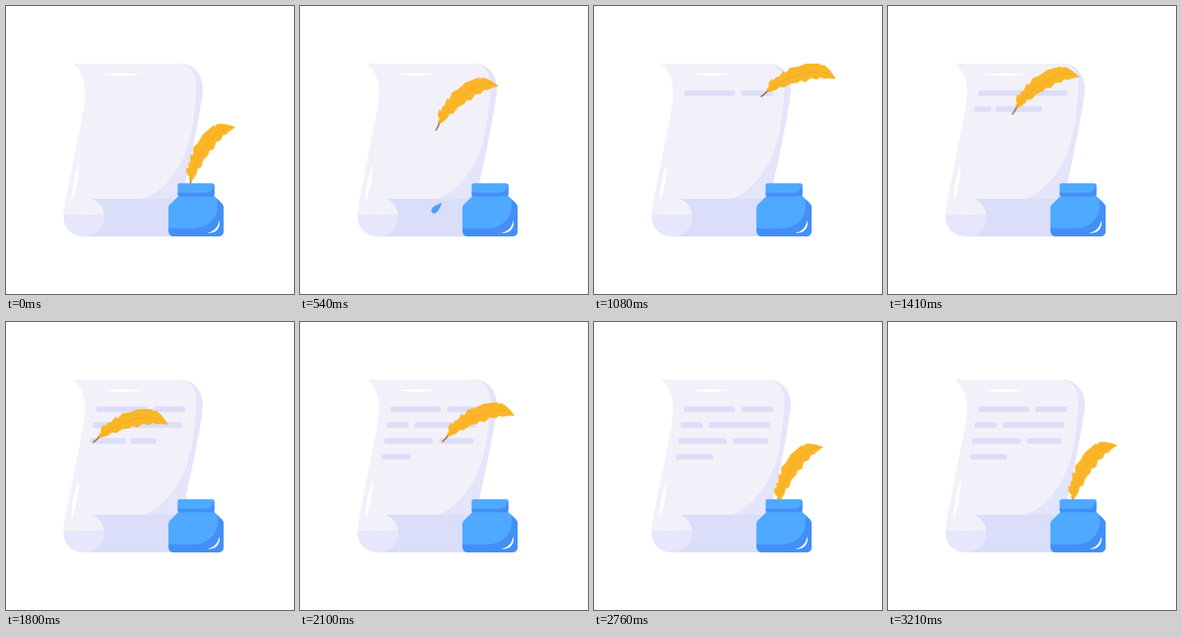
An HTML page without scripts for the animation above (3270 ms loop, 360x360 px).

```html
<!DOCTYPE html>
<html lang="en">
<head>
<meta charset="utf-8">
<title>Quill and paper</title>
<style>
html, body { margin: 0; width: 100%; height: 100%; overflow: hidden; background: #fff; }
svg { display: block; width: 100vw; height: 100vh; }

.quill, .drop, .line { animation: 3270ms linear infinite both; }
.quill { animation-name: write; }
.drop { animation-name: drip; }
.line { fill: none; stroke: #dcdef8; stroke-width: 7; stroke-linecap: round; }
.l1 { transform-origin: 113px 0; animation-name: l1; }
.l2 { transform-origin: 108px 0; animation-name: l2; }
.l3 { transform-origin: 105px 0; animation-name: l3; }
.l4 { transform-origin: 102px 0; animation-name: l4; }

/* position of the nib, then tilt of the feather */
@keyframes write {
  0% { transform: translate(229.5px, 228px) rotate(-40deg); }
  4.6% { transform: translate(228px, 196px) rotate(-34deg); }
  8.3% { transform: translate(206px, 165px) rotate(-27deg); }
  11.9% { transform: translate(172px, 153px) rotate(-22deg); }
  16.5% { transform: translate(170px, 155px) rotate(-22deg); animation-timing-function: ease-in-out; }
  23.9% { transform: translate(95px, 112px) rotate(-22deg); }
  33% { transform: translate(209px, 113px) rotate(0deg); }
  34.3% { transform: translate(214px, 114px) rotate(0deg); }
  38.2% { transform: translate(118px, 132px) rotate(-2deg); }
  39.5% { transform: translate(107px, 134px) rotate(-22deg); }
  43.1% { transform: translate(155px, 135px) rotate(-16deg); }
  47.7% { transform: translate(214px, 133px) rotate(0deg); }
  55.1% { transform: translate(109px, 150px) rotate(0deg); }
  57.2% { transform: translate(96px, 148px) rotate(-22deg); }
  67.3% { transform: translate(214px, 150px) rotate(0deg); }
  68.3% { transform: translate(214px, 151px) rotate(0deg); }
  73.4% { transform: translate(226px, 197px) rotate(-25.5deg); }
  77% { transform: translate(229px, 220px) rotate(-36deg); }
  82.6% { transform: translate(229.5px, 233px) rotate(-40deg); }
  98.2% { transform: translate(229.5px, 230.5px) rotate(-40deg); }
  100% { transform: translate(229.5px, 228px) rotate(-40deg); }
}
@keyframes drip {
  0%, 10.9% { transform: translate(171px, 158px) scale(0); }
  11% { transform: translate(171px, 158px) scale(.4); animation-timing-function: ease-in; }
  16.5% { transform: translate(170px, 252px) scale(1); opacity: 1; }
  18.3%, 100% { transform: translate(168px, 282px) scale(1); opacity: 0; }
}
@keyframes l1 { 0%, 23.9% { transform: scaleX(0); } 32.8%, 100% { transform: none; } }
@keyframes l2 { 0%, 36.3% { transform: scaleX(0); } 43.1% { transform: scaleX(.75); } 46%, 100% { transform: none; } }
@keyframes l3 { 0%, 48.3% { transform: scaleX(0); } 55.1% { transform: scaleX(.74); } 58%, 100% { transform: none; } }
@keyframes l4 { 0%, 59.5% { transform: scaleX(0); } 65.6%, 100% { transform: none; } }
</style>
</head>
<body>
<svg viewBox="0 0 360 360">
  <!-- paper -->
  <path fill="#e4e4fb" d="M170 72H219C238 73 247 90 246 107C241 145 230 195 224 222L215 250H150Z"/>
  <path fill="#f2f1fa" d="M84 72H219C231 74 238 84 238 100C237 130 232 165 224 184C212 213 192 235 169 242L123 262L72 263C72 250 76 235 78 224L97 128C101 104 99 85 84 72Z"/>
  <path fill="#dadef9" d="M107 241H216L206 288H98L123 262C122 252 116 244 107 241Z"/>
  <path fill="#e6e6fc" d="M72 261Q98 262 123 260C124 277 113 288 98 288C82 288 71 277 72 261Z"/>
  <path fill="#fff" d="M121 85.5Q146 82 171 85.5Q146 89 121 85.5Z"/>
  <path fill="#fff" d="M91 197Q91 222 82 246Q82 220 91 197Z"/>

  <!-- writing -->
  <path class="line l1" d="M116 109H173M187.500 109H220.500"/>
  <path class="line l2" d="M111.500 128.700H132.500M146.500 128.700H217"/>
  <path class="line l3" d="M108.500 148.700H162.500M177 148.700H214"/>
  <path class="line l4" d="M105.500 168.500H145.500"/>

  <g class="drop">
    <path fill="#479ff6" d="M7 -7C6 -2 3 5 -2 6.500C-6 7 -7 2 -4 -1C-1 -4 4 -5 7 -7Z"/>
  </g>

  <!-- feather -->
  <g class="quill">
    <path fill="none" stroke="#a8642c" stroke-width="1.800" stroke-linecap="round" d="M0 0Q5 -3 9 -9"/>
    <path fill="#fab627" d="M8 -5L6.500 -10L9 -11L9 -17L13 -22L15 -20L19 -25L21 -24L28 -32L30 -29L36 -36L45 -37L56 -41L75 -41L73 -39L79 -39Q88 -32 93 -21.500Q84 -23 78 -22L74 -24L69 -21L62 -23L55 -18L49 -20L45 -17L36 -16L28 -11L23 -12L18 -8Z"/>
    <path fill="none" stroke="#f6a722" stroke-width="1" d="M8 -7Q32 -28 70 -31Q84 -30 92 -23"/>
  </g>

  <!-- ink bottle -->
  <path fill="#4fa9ff" d="M216 237H260L270 247Q272 249 272 253V281Q272 288 265 288H210Q203 288 203 281V253Q203 249 206 247Z"/>
  <path fill="#438ff7" d="M264 241L270 247Q272 249 272 253V281Q272 288 265 288H210Q203 288 203 278H232C256 278 268 262 264 241Z"/>
  <rect x="214.500" y="221.500" width="46" height="16.500" rx="3" fill="#4fa9ff"/>
  <path fill="#438ff7" d="M260 223Q260.500 224 260.500 226V235Q260.500 238 257 238H218Q214.500 238 214.500 233.500H248Q259 233 260 223Z"/>
  <path fill="#fff" d="M266.500 268C269 277 262 285 252 283.500C260 282 265 277 266.500 268Z"/>
</svg>
</body>
</html>
```
